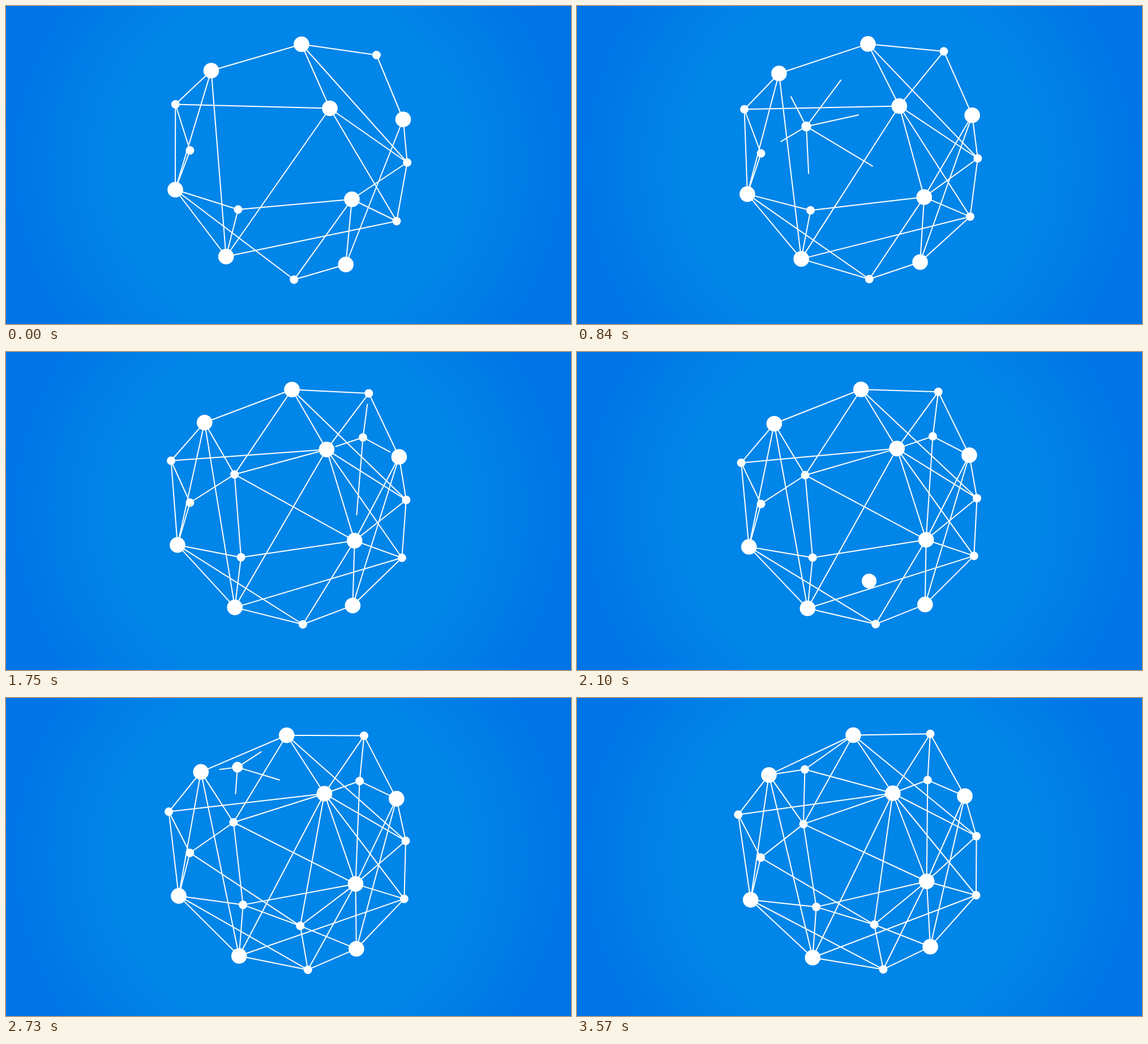
An HTML page with a canvas that plays this animation: 998 by 561 pixels, repeating every 3640 ms.

```html
<!DOCTYPE html>
<html lang="en">
<head>
<meta charset="utf-8">
<title>Growing network</title>
<style>
  html, body { margin: 0; width: 100%; height: 100%; overflow: hidden; background: #0085e8; }
  canvas { display: block; }
</style>
</head>
<body>
<canvas id="stage" width="998" height="561"></canvas>
<script>
const ctx = document.getElementById('stage').getContext('2d');
const LOOP = 3640, STEP = 70, TURN = 2380, END = 3570;
const BIG = 13.8, SMALL = 7.5, PEAK = 14.5;
const GROW = 280, SHRINK = 380, REACH = 560;

// Each node: start x, y, then x, y at TURN, then x, y at END, radius,
// and for late nodes the time of the largest size.
const nodes = [
  [522, 67.5, 499, 65.8, 488, 65.5, BIG],
  [654.5, 86.5, 636, 68, 624, 63.3, SMALL],
  [362.5, 114, 346.5, 128.2, 339, 135.7, BIG],
  [299.3, 173.5, 288.8, 198.3, 284.8, 205.8, SMALL],
  [572, 180.5, 564.3, 169, 557.8, 168, BIG],
  [701.5, 200, 691.8, 179.6, 685, 173, BIG],
  [708.7, 276, 706.2, 255.5, 705.5, 243.7, SMALL],
  [690, 379.5, 702.7, 357, 705, 348, SMALL],
  [611, 341, 617.4, 330, 617.7, 323.5, BIG],
  [600.2, 456, 616.8, 444, 624, 438.7, BIG],
  [508.8, 482.8, 530, 479.7, 541, 478.7, SMALL],
  [388.7, 442, 409.8, 453.7, 416.3, 458, BIG],
  [410, 359, 417, 363.3, 422.6, 368.6, SMALL],
  [299, 324, 304.4, 346.3, 306.7, 356, BIG],
  [325, 254.8, 325, 269.7, 324.5, 281.6, SMALL],
  [406.3, 209.3, 402.6, 218.3, 400, 222.4, SMALL, 526],
  [640.9, 160.2, 626.8, 147.3, 619.3, 144.8, SMALL, 1330],
  [504, 411, 517.6, 403, 525, 399.8, SMALL, 2128],
  [424, 113, 411.5, 120.5, 402.4, 126, SMALL, 2460]
].map(([x0, y0, x1, y1, x2, y2, radius, peak]) => ({ x: [x0, x1, x2], y: [y0, y1, y2], radius, peak }));

// From node -> to nodes
const fixedLinks = {
  0: [1, 2, 4, 6], 1: [5], 2: [3, 11, 13], 3: [4, 13, 14], 4: [6, 7, 11],
  5: [6, 9], 6: [7, 8], 7: [8, 11], 8: [9, 10, 12], 9: [10],
  10: [13], 11: [12, 13], 12: [13], 13: [14]
};
const earlyLinks = { 4: [1, 8], 8: [5], 9: [7], 11: [10] };
const lateLinks = {
  15: [0, 2, 4, 8, 12, 14], 16: [1, 4, 5, 8],
  17: [4, 8, 9, 10, 12, 14], 18: [0, 2, 4, 15]
};

const background = ctx.createRadialGradient(499, 280, 0, 499, 280, 510);
background.addColorStop(0, '#0085e8');
background.addColorStop(0.62, '#0085e8');
background.addColorStop(1, '#0074e6');

const clamp = v => Math.max(0, Math.min(1, v));
const mix = (a, b, p) => a + (b - a) * p;
const along = ([a, b, c], t) =>
  t < TURN ? mix(a, b, t / TURN) : mix(b, c, (t - TURN) / (END - TURN));

function radiusAt({ radius, peak }, t) {
  if (peak === undefined) return radius;
  return t < peak
    ? PEAK * clamp(1 + (t - peak) / GROW)
    : mix(PEAK, radius, clamp((t - peak) / SHRINK));
}

function drawLinks(links, points, reach) {
  for (const from in links) {
    const a = points[from], p = reach(nodes[from]);
    if (p <= 0) continue;
    for (const to of links[from]) {
      const b = points[to];
      ctx.moveTo(a.x, a.y);
      ctx.lineTo(mix(a.x, b.x, p), mix(a.y, b.y, p));
    }
  }
}

function draw(t) {
  const points = nodes.map(n => ({ x: along(n.x, t), y: along(n.y, t), r: radiusAt(n, t) }));
  ctx.fillStyle = background;
  ctx.fillRect(0, 0, 998, 561);

  ctx.strokeStyle = ctx.fillStyle = '#fff';
  ctx.lineWidth = 2;
  ctx.lineCap = 'round';
  ctx.beginPath();
  drawLinks(fixedLinks, points, () => 1);
  drawLinks(earlyLinks, points, () => clamp(t / REACH));
  drawLinks(lateLinks, points, n => clamp((t - n.peak) / REACH));
  ctx.stroke();

  for (const { x, y, r } of points) {
    ctx.beginPath();
    ctx.arc(x, y, r, 0, Math.PI * 2);
    ctx.fill();
  }
}

const start = performance.now();
function tick() {
  const t = (performance.now() - start) % LOOP;
  draw(Math.floor(t / STEP) * STEP);
  requestAnimationFrame(tick);
}
tick();
</script>
</body>
</html>
```
